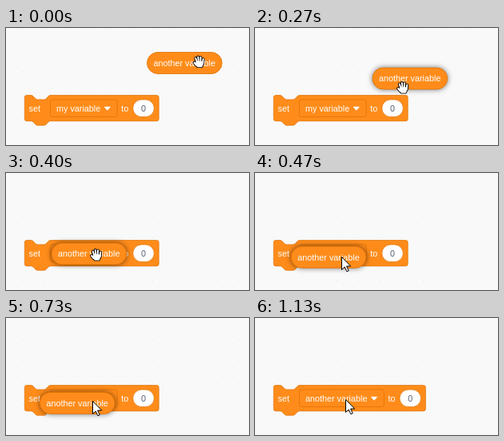
An HTML page with a canvas for the animation above (1.63 s loop, 304 by 147 pixels).

```html
<!DOCTYPE html>
<html lang="en">
<head>
<meta charset="utf-8">
<title>Dropping a variable into a block</title>
<style>
  html, body { margin: 0; width: 100%; height: 100%; overflow: hidden; background: #f9f9f9; }
  canvas { display: block; width: 304px; height: 147px; }
</style>
</head>
<body>
<canvas id="stage"></canvas>
<script>
const W = 304, H = 147, LOOP = 1630, ZOOM = 0.675;
const ORANGE = '#ff8c1a', EDGE = '#db6e00';
const FONT = '10.8px "Liberation Sans", Arial, sans-serif';
const canvas = document.getElementById('stage');
const ctx = canvas.getContext('2d');
const dpr = window.devicePixelRatio || 1;
canvas.width = W * dpr;
canvas.height = H * dpr;

const steps = [
  { at: 0, pill: [176.5, 30.5], hand: [241.5, 42.5] },
  { at: 200, pill: [176.5, 30.5], arrow: [228, 55] },
  { at: 270, pill: [147, 50], hand: [185, 75], lifted: true },
  { at: 330, pill: [102.5, 70.5], hand: [135, 96.5], lifted: true },
  { at: 400, pill: [57, 88], hand: [113, 103], lifted: true },
  { at: 470, pill: [45.3, 92.3], arrow: [108, 105], lifted: true },
  { at: 530, pill: [44, 93], arrow: [108, 105], lifted: true },
  { at: 600, pill: [43.3, 93.3], arrow: [108, 105], lifted: true },
  { at: 730, pill: [42.4, 93.4], arrow: [108, 104], lifted: true },
  { at: 800, pill: [44.5, 92.4], arrow: [111, 103], lifted: true },
  { at: 870, pill: [47.4, 91.3], arrow: [113, 102], lifted: true },
  { at: 1130, arrow: [113, 102] }
];

function paint(path, fill, stroke, width) {
  ctx.fillStyle = fill;
  ctx.fill(path);
  ctx.strokeStyle = stroke;
  ctx.lineWidth = width;
  ctx.stroke(path);
}

function box(x, y, w, h, r, fill = ORANGE, stroke = EDGE) {
  const path = new Path2D();
  path.roundRect(x, y, w, h, r);
  paint(path, fill, stroke, ZOOM);
}

function label(text, x, y, color = '#fff') {
  ctx.fillStyle = color;
  ctx.fillText(text, x, y);
}

function background() {
  ctx.fillStyle = '#f9f9f9';
  ctx.fillRect(0, 0, W, H);
  ctx.fillStyle = '#e4e4e4';
  for (let y = 0; y < H; y += 27)
    for (let x = 21; x < W; x += 27) ctx.fillRect(x, y, 1, 1);
}

function stackOutline(width) {
  return new Path2D(`M0 4a4 4 0 0 1 4-4H12c2 0 3 1 4 2l4 4c1 1 2 2 4 2h12
    c2 0 3-1 4-2l4-4c1-1 2-2 4-2H${width - 4}a4 4 0 0 1 4 4v40a4 4 0 0 1-4 4
    H48c-2 0-3 1-4 2l-4 4c-1 1-2 2-4 2h-12c-2 0-3-1-4-2l-4-4c-1-1-2-2-4-2
    H4a4 4 0 0 1-4-4z`);
}

function setBlock(name) {
  const nameWidth = ctx.measureText(name).width;
  const fieldWidth = nameWidth + 28.6;
  const end = 55.4 + fieldWidth;
  ctx.save();
  ctx.translate(23.3, 84.5);
  ctx.scale(ZOOM, ZOOM);
  paint(stackOutline((end + 52 - 23.3) / ZOOM), ORANGE, EDGE, 1);
  ctx.restore();

  label('set', 28.5, 104.7);
  box(55.4, 90, fieldWidth, 21.6, 2.7);
  label(name, 63, 104.7);
  const tip = 63 + nameWidth + 8.6;
  const triangle = new Path2D(`M${tip - 3.2} 99.4h6.4l-3.2 3.4z`);
  ctx.lineJoin = 'round';
  paint(triangle, '#fff', '#fff', 1.2);
  label('to', end + 5, 104.7);
  box(end + 19.6, 90, 26.5, 21.6, 10.8, '#fff');
  label('0', end + 29.8, 104.7, '#575e75');
}

function variablePill([x, y], lifted) {
  ctx.save();
  if (lifted) {
    ctx.shadowColor = 'rgba(0,0,0,.6)';
    ctx.shadowBlur = 7 * dpr;
  }
  ctx.fillStyle = ORANGE;
  ctx.beginPath();
  ctx.roundRect(x, y, 93.7, 27, 13.5);
  ctx.fill();
  ctx.restore();
  box(x, y, 93.7, 27, 13.5);
  label('another variable', x + 8, y + 17.4);
}

function arrowCursor([x, y]) {
  ctx.save();
  ctx.translate(x + 0.5, y + 0.5);
  ctx.lineJoin = 'miter';
  paint(new Path2D('M0 0V16L3.7 12.6 6.4 18.3 8.7 17.3 6.1 11.6H11.2Z'), '#fff', '#000', 1);
  ctx.restore();
}

function handCursor([x, y]) {
  const fingers = new Path2D('M-6 1L-3.5 4M-4.3-4.5L-2.3 1M-1.2-6L-.6 0M2-5.7L1.8 0M5.2-3.4L4.6 2');
  const palm = new Path2D('M-3.5-.5H5.5L5.3 2.5 3.5 6.5H-2L-5 3Z');
  ctx.save();
  ctx.translate(x, y);
  ctx.lineCap = ctx.lineJoin = 'round';
  for (const [color, finger, edge] of [['#000', 3.8, 2.2], ['#fff', 2, 0.4]]) {
    ctx.strokeStyle = color;
    ctx.lineWidth = finger;
    ctx.stroke(fingers);
    paint(palm, color, color, edge);
  }
  ctx.restore();
}

function draw(time) {
  const step = steps.findLast(s => s.at <= time);
  ctx.setTransform(dpr, 0, 0, dpr, 0, 0);
  ctx.font = FONT;
  background();
  setBlock(step.pill ? 'my variable' : 'another variable');
  if (step.pill) variablePill(step.pill, step.lifted);
  if (step.hand) handCursor(step.hand);
  else arrowCursor(step.arrow);
}

let start;
function tick(now) {
  start ??= now;
  draw(Math.max(0, now - start) % LOOP);
  requestAnimationFrame(tick);
}
draw(0);
requestAnimationFrame(tick);
</script>
</body>
</html>
```
